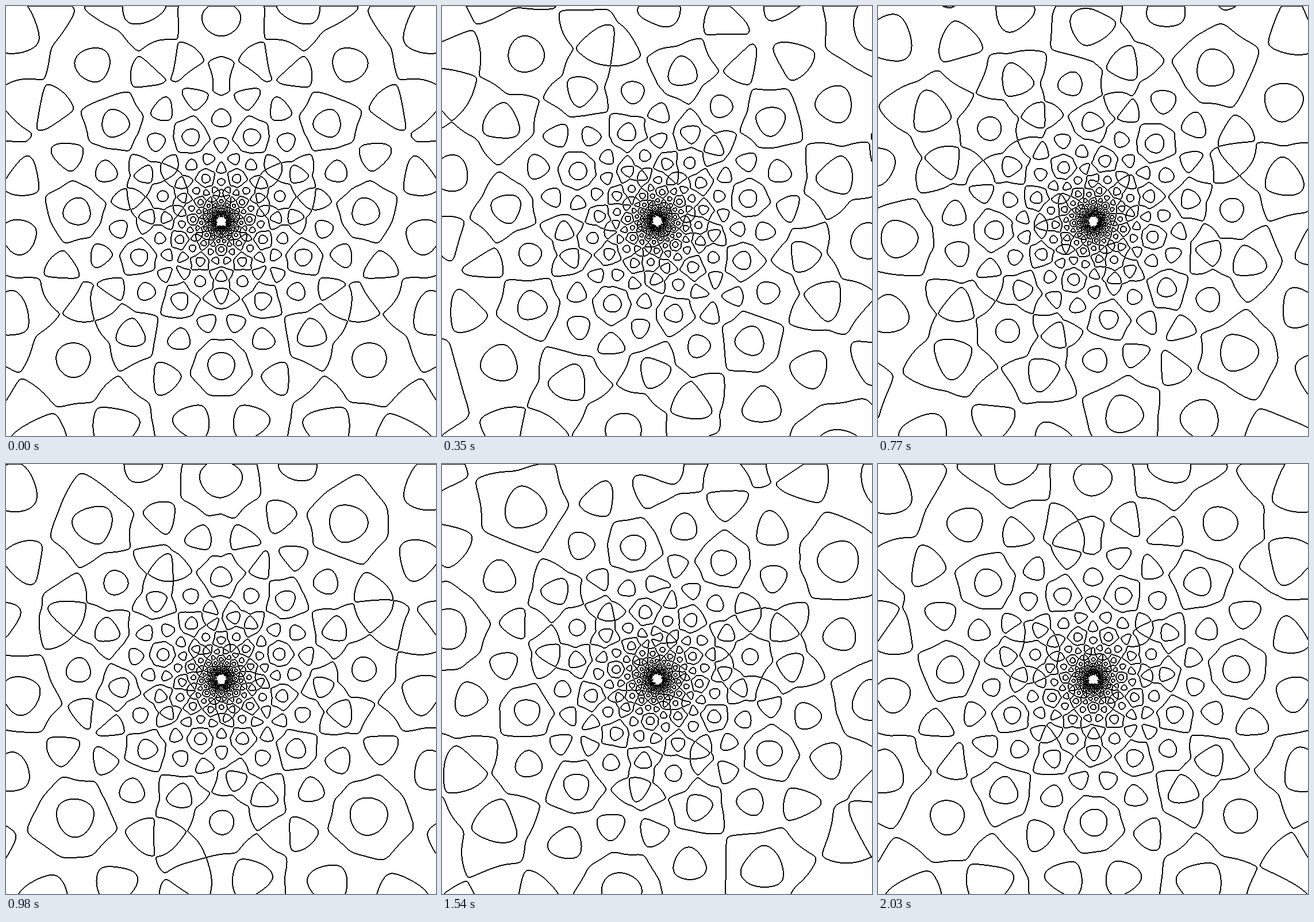
Recreate the animation shown at these times as an HTML page with a canvas. Size 748 by 748 pixels, loop 2.1 s.

```html
<!DOCTYPE html>
<html lang="en">
<head>
<meta charset="utf-8">
<title>Log-polar quasicrystal</title>
<style>
  html, body { margin: 0; width: 100%; height: 100%; overflow: hidden; background: #fff; }
  canvas { display: block; }
</style>
</head>
<body>
<canvas id="stage" width="748" height="748"></canvas>
<script>
const SIZE = 748, WAVES = 4, STRIPES = 27;
const STEPS = 30, STEP_MS = 70;
const LEVEL = -0.24;          // contour height
const UNIT = 0.935;           // radius at which the log is zero
const BLUR = 12;              // waves finer than this radius fade out

const ctx = document.getElementById('stage').getContext('2d');
const image = ctx.createImageData(SIZE, SIZE);
const pixels = new Uint32Array(image.data.buffer);
const even = new Float32Array(SIZE * SIZE);
const odd = new Float32Array(SIZE * SIZE);
const low = new Uint8Array(SIZE * SIZE);

// Sum of plane waves over (angle, log radius), split into cosine and sine parts
for (let y = 0, i = 0; y < SIZE; y++) {
  for (let x = 0; x < SIZE; x++, i++) {
    const dx = x - SIZE / 2, dy = y - SIZE / 2;
    const r = Math.max(Math.hypot(dx, dy), 0.5);
    const theta = Math.atan2(dx, dy), u = Math.log(r / UNIT);
    const fade = Math.exp(-((BLUR / r) ** 2));
    for (let k = 0; k < WAVES; k++) {
      const a = k * Math.PI / WAVES;
      const p = STRIPES * (theta * Math.cos(a) - u * Math.sin(a));
      even[i] += fade * Math.cos(p);
      odd[i] += fade * Math.sin(p);
    }
  }
}

function draw(step) {
  const phase = step * 2 * Math.PI / STEPS;
  const c = Math.cos(phase), s = Math.sin(phase);
  for (let i = 0; i < low.length; i++) low[i] = even[i] * c - odd[i] * s < LEVEL ? 1 : 0;

  // Ink both sides of every contour; the top row borders on high ground
  const last = SIZE - 1;
  for (let y = 0, i = 0; y < SIZE; y++) {
    for (let x = 0; x < SIZE; x++, i++) {
      const here = low[i];
      const edge =
        here !== (y > 0 ? low[i - SIZE] : 0) ||
        (y < last && here !== low[i + SIZE]) ||
        (x > 0 && here !== low[i - 1]) ||
        (x < last && here !== low[i + 1]);
      pixels[i] = edge ? 0xff000000 : 0xffffffff;
    }
  }
  ctx.putImageData(image, 0, 0);
}

const start = performance.now();
let shown = -1;
function tick() {
  const step = Math.floor((performance.now() - start) / STEP_MS) % STEPS;
  if (step !== shown) draw(shown = step);
  requestAnimationFrame(tick);
}
tick();
</script>
</body>
</html>
```
